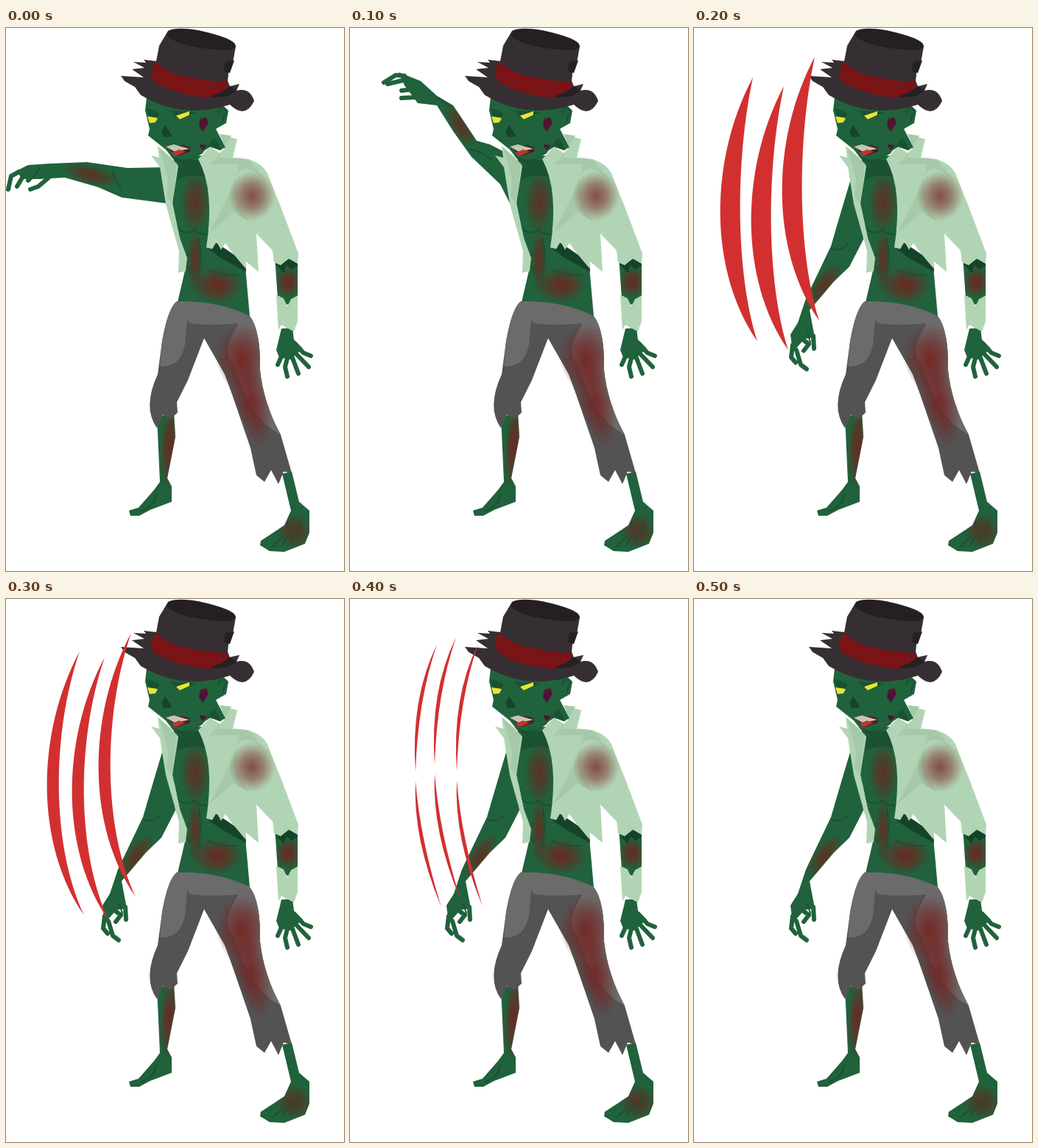
These frames come from a looping animation (459x737 px, 600 ms). An HTML page with a canvas:

```html
<!DOCTYPE html>
<html lang="en">
<head>
<meta charset="utf-8">
<title>Zombie claw swipe</title>
<style>
html, body { margin: 0; width: 100%; height: 100%; overflow: hidden; background: #fff; }
canvas { display: block; }
</style>
</head>
<body>
<canvas id="stage" width="459" height="737"></canvas>
<script>
const ctx = document.getElementById('stage').getContext('2d');
const SKIN = '#20623c', DARK = '#1a5131', DEEP = '#14432a';
const SHIRT = '#b1d5b4', FOLD = '#a6caa9';
const HAT = '#352f33', BLACK = '#231f22', BAND = '#7a1416';
const CLOTH = '#535353', LIGHT = '#6b6b6b', SLASH = '#d23030';
const BLOOD = '#74201e', BROWN = '#642a20', ROSE = '#7d3734';
ctx.lineCap = ctx.lineJoin = 'round';

// Soft blood stain inside a tilted ellipse
function stain(color, x, y, rx, ry, tilt = 0) {
  ctx.save();
  ctx.translate(x, y);
  ctx.rotate(tilt * Math.PI / 180);
  ctx.scale(rx, ry);
  const g = ctx.createRadialGradient(0, 0, 0, 0, 0, 1);
  g.addColorStop(0, color + 'dd');
  g.addColorStop(.5, color + '88');
  g.addColorStop(1, color + '00');
  ctx.fillStyle = g;
  ctx.fillRect(-1, -1, 2, 2);
  ctx.restore();
}

// Fills a shape; stains are clipped to it
function fill(color, d, ...stains) {
  const path = new Path2D(d);
  ctx.fillStyle = color;
  ctx.fill(path);
  ctx.save();
  ctx.clip(path);
  stains.forEach(s => stain(...s));
  ctx.restore();
}

function line(color, width, d) {
  ctx.strokeStyle = color;
  ctx.lineWidth = width;
  ctx.stroke(new Path2D(d));
}

const fingers = d => line(SKIN, 6, d);
const crease = d => line(DARK, 2, d);

const arms = {
  level() {
    fill(SKIN, 'M217 189L165 190 110 182 60 184 30 186 14 194 22 205 46 205 80 203 125 216 157 230 218 238Z',
      [BROWN, 115, 199, 40, 14, 14]);
    fingers('M18 195L7 201 3 219M24 200L15 215M34 203L30 207M58 203L44 215 33 219');
    crease('M146 193Q144 206 157 216M46 190L36 203');
  },
  raised() {
    fill(SKIN, `M217 172L190 158 172 153 140 105 118 92 96 72 66 60 74 78 92 102 118 105 140 140
      165 175 204 212 218 240Z`, [BROWN, 150, 132, 34, 14, 58]);
    fingers('M74 65L62 64 46 74M72 71L51 76M86 83L70 85M90 94L70 95');
    crease('M119 95L136 106M163 165Q178 167 192 178');
  },
  lowered() {
    fill(SKIN, `M212 208L195 265 186 296 152 367 141 400 131 416 134 440 150 422 164 420 157 383
      190 344 211 324 230 287 228 238Z`, [BROWN, 177, 349, 15, 36, 35]);
    fingers('M134 430L132 447 138 454M139 437L145 457 153 463M148 423L156 429 149 438M162 418L163 435');
    crease('M187 300Q202 303 209 293M154 415L158 426');
  }
};

function torso() {
  fill(SKIN, 'M228 176L280 172 282 290 325 324 331 391Q290 372 233 372L244 325 226 238Z',
    [BROWN, 257, 236, 20, 42],
    [BLOOD, 287, 349, 34, 25],
    [BROWN, 257, 315, 11, 46]);
  fill(DARK, 'M234 180L280 178 278 205Q255 195 233 206Z');
  crease(`M231 269Q245 284 256 273Q266 284 277 278M262 285Q266 310 261 337M275 329Q295 337 313 335
    M249 304Q239 318 250 331`);
  fill(DEEP, 'M272 298L282 289 325 318 326 331 293 313Z');
}

function legs() {
  fill(SKIN, `M205 528L228 522 230 555 219 611 225 622 225 643 196 654 181 662 169 662 167 655 180 651
    201 627 209 616Z`, [BLOOD, 222, 567, 13, 58, 4]);
  fill(SKIN, `M375 605L388 602 398 643 412 655 412 685 406 700 378 711 358 710 345 702 346 696 378 675
    387 655Z`, [BROWN, 391, 683, 25, 24]);
  crease('M185 655Q202 648 204 633M362 704L377 690M375 703L388 681M387 701L399 673');
}

function trousers() {
  const side = 'Q346 410 345 465Q350 510 373 552';
  fill(CLOTH, `M232 371Q290 370 331 391${side}L388 604 377 602 370 619 360 600 351 616 340 607 332 570
    308 500 297 470 269 421 247 478 232 508 233 522 223 531 213 525 205 543Q185 515 206 470L212 425
    Q220 380 232 371Z`);
  fill(LIGHT, 'M232 371L247 389 243 430Q236 462 209 459L212 425Q220 380 232 371Z');
  fill(LIGHT, 'M232 371Q290 370 331 391L316 401Q280 404 250 401Z');
  fill(LIGHT, `M331 391${side}Q330 530 310 458Q290 440 316 401Z`);
  ctx.save();
  ctx.clip(new Path2D(`M269 421L331 391${side}L340 570Z`));
  stain(BLOOD, 320, 448, 36, 46);
  stain(BLOOD, 333, 505, 25, 66, -13);
  ctx.restore();
}

function hangingArm() {
  fill(SKIN, 'M365 310L396 308 396 370 383 376 369 367Z', [BLOOD, 383, 345, 18, 22]);
  fill(DEEP, 'M366 320L396 311 396 323 387 328 381 322 377 333Z');
  fill(SKIN, 'M374 408L389 407 391 423 403 435 386 450 371 447 367 437Z');
  fingers('M392 428L404 441 414 445M392 440L411 460M388 445L397 469M382 448L379 460 382 473M374 446L369 457');
  fill(SHIRT, 'M367 362L377 367 382 378 387 368 396 363 396 398 391 412 374 403 370 410Z');
}

function shirt() {
  fill(SHIRT, `M197 173L208 176 206 160 222 174 234 187 226 238 236 285 246 312 244 330 234 332 235 303
    217 239 209 189Z`);
  fill(FOLD, 'M208 162L232 184 226 238 218 230 220 205Z');
  fill(SHIRT, `M261 178L277 161 291 170 298 162 290 144 314 151 308 176Q350 176 358 205L374 245 397 306
    396 320 384 313 373 322 364 318 362 302 340 279 343 331 326 317 325 326 305 302 298 292 292 301
    286 290 280 300 272 298Q284 220 261 178Z`);
  fill(FOLD, `M290 144L306 146 289 176 330 178 353 207Q325 180 312 200Q312 255 342 270L309 250 276 278
    309 215 317 185 277 185 298 162Z`);
  stain(ROSE, 334, 228, 32, 34);
}

function head() {
  fill(SKIN, `M191 94L189 112 195 137 193 146 217 165 231 183 240 188 277 161 290 166 298 162 285 137
    299 129 302 112 285 96Z`);
  fill(DARK, 'M223 174Q246 185 267 170L283 148 293 166 277 161 240 187Z');
  fill(DARK, 'M190 108L207 115 207 123 195 120ZM222 112L258 114 236 125Z');
  fill('#e8e338', 'M192 120L206 122 203 128 195 129ZM231 119L249 113 249 118 236 124Z');
  fill(DEEP, 'M216 132L211 141 214 148 226 147Z');
  crease('M288 115Q294 104 299 114L294 126');
  fill('#4b1f20', 'M217 160L241 159 250 162 250 168 231 174Z');
  fill('#c5c5b3', 'M217 161L228 158 249 164 229 168Z');
  fill('#bd3430', 'M225 169L235 165 244 168 230 174Z');
  fill('#501334', 'M264 123L272 121 275 129 267 141 262 133ZM262 158L273 159 267 166Z');
}

function hat() {
  fill(HAT, `M220 4L208 24 204 45 187 43 190 47 173 46 188 54 171 56 187 67 156 65 161 72 175 80 183 91
    Q240 125 304 104Q325 124 337 99Q331 80 313 85L317 76 304 79 301 72 303 53 308 47 312 25Z`);
  fill(BLACK, 'M220 4Q231-2 261 3Q311 14 312 24Q310 33 280 29Q228 23 219 10Z');
  fill(BAND, 'M202 45Q220 62 250 67Q278 73 302 73L299 91 275 95Q213 88 196 66Z');
  fill(BLACK, 'M298 46L310 44 304 61 296 59ZM276 94L292 87 304 79 313 85 300 93Z');
}

// Three equal claw marks, each shifted to its own place
function claws(d, places) {
  for (const [x, y] of places) {
    ctx.save();
    ctx.translate(x, y);
    fill(SLASH, d);
    ctx.restore();
  }
}
const crescent = inner => `M80 67C20 180 20 330 86 425C${inner} 330 ${inner} 180 80 67Z`;
const torn = 'M80 67Q44 140 51 240Q54 142 80 67ZM51 252Q47 330 86 423Q57 330 51 252Z';

const steps = [
  { arm: 'level' },
  { arm: 'raised' },
  { arm: 'lowered', mark: crescent(56), places: [[0, 0], [42, 12], [84, -28]] },
  { arm: 'lowered', mark: crescent(41.5), places: [[20, 4], [54, 12], [90, -21]] },
  { arm: 'lowered', mark: torn, places: [[38, -5], [64, -15], [94, -6]] },
  { arm: 'lowered' }
];

function draw(time) {
  const { arm, mark, places } = steps[Math.floor(time % 600 / 100)];
  ctx.fillStyle = '#fff';
  ctx.fillRect(0, 0, 459, 737);
  arms[arm]();
  torso();
  legs();
  trousers();
  hangingArm();
  shirt();
  head();
  hat();
  if (mark) claws(mark, places);
}

const start = performance.now();
function tick() {
  draw(performance.now() - start);
  requestAnimationFrame(tick);
}
tick();
</script>
</body>
</html>
```
